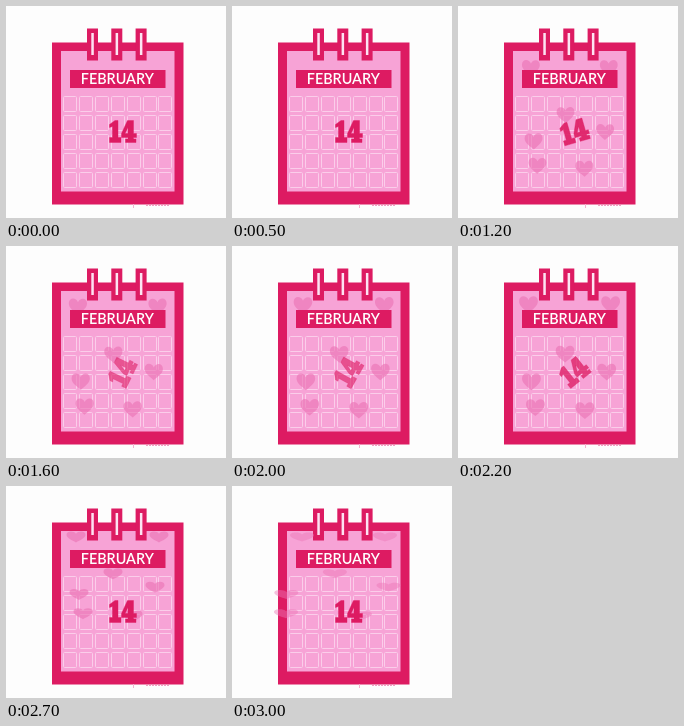
An HTML page with a canvas that plays this animation: 220 by 212 pixels, repeating every 3200 ms.

```html
<!DOCTYPE html>
<html lang="en">
<head>
<meta charset="utf-8">
<title>Calendar</title>
<style>
html, body { margin: 0; width: 100%; height: 100%; overflow: hidden; background: #fdfdfd; }
canvas { display: block; }
</style>
</head>
<body>
<canvas id="stage" width="220" height="212"></canvas>
<script>
const ctx = document.getElementById('stage').getContext('2d');
const RED = '#dd1b62', PINK = '#f7a3d6', LINE = '#fbcdea', HEART = '#eb75b5';
const CX = 117, CY = 126, TOP = 31;

// Where the hearts come to rest after bursting out of the date
const RESTS = [[107, 108], [149, 126], [73, 136], [77, 162], [127, 165], [70, 58], [153, 58]];

const heart = new Path2D('M0 .5C-.2 .3-.5 .1-.5-.2C-.5-.58-.1-.58 0-.28C.1-.58 .5-.58 .5-.2C.5 .1 .2 .3 0 .5Z');
const digits = new Path2D(
  'M-13.5-7L-8-11H-5V6H-2V11H-13.5V6H-10.5V-5L-13.5-4Z' +
  'M4.5-11H10.5V2H13.5V6H10.5V7.5H13V11H2.5V7.5H5V6H-1.5V2Z' +
  'M5-4L2 2H5Z');

// Progress from 0 to 1 between two times
const part = (t, from, to) => Math.min(1, Math.max(0, (t - from) / (to - from)));

function rect(color, x, y, w, h) {
  ctx.fillStyle = color;
  ctx.fillRect(x, y, w, h);
}

function place(x, y, degrees, alpha, draw) {
  ctx.save();
  ctx.translate(x, y);
  ctx.rotate(degrees * Math.PI / 180);
  ctx.globalAlpha = alpha;
  draw();
  ctx.restore();
}

function drawCalendar() {
  rect('#fdfdfd', 0, 0, 220, 212);
  rect(RED, 46, 36.5, 131.5, 162);
  rect(PINK, 55, 45, 113.5, 140.5);
  for (let i = 0; i < 3; i++) {
    const x = 81 + i * 24.3;
    rect(RED, x, 22.5, 11, 32);
    rect('#fde3f3', x + 4.3, 27, 2.5, 22);
  }
  ctx.strokeStyle = LINE;
  ctx.lineWidth = 1;
  for (let row = 0; row < 5; row++)
    for (let col = 0; col < 7; col++) {
      ctx.beginPath();
      ctx.roundRect(57.5 + Math.round(col * 15.9), 90.5 + Math.round(row * 19.1), 13, 15, 1);
      ctx.stroke();
    }
  // Faint fine print under the frame
  rect('#f3b3cf', 127, 198, 1, 4);
  for (let x = 140; x < 163; x += 3) rect('#f0a0c2', x, 199, 2, 1);
}

function drawHearts(t) {
  const burst = part(t, 500, 1000);
  const grow = burst * (0.93 + 0.07 * part(t, 1000, 2400));
  const squash = part(t, 2400, 2700), flare = part(t, 2700, 3000);
  ctx.fillStyle = HEART;
  RESTS.forEach(([restX, restY], i) => {
    const x = CX + (restX - CX) * grow;
    const y = CY + (restY - CY) * grow;
    const risen = y - (y - TOP) * 0.262 * squash;
    // The lower a heart sits, the further it is thrown sideways
    const throwX = (x - 125) * 0.5 * (risen - 51) / 80 * flare;
    const tilt = (i % 2 ? 22 : -22) * (1 - grow);
    place(x + throwX, risen, tilt, 0.65 - 0.2 * flare, () => {
      ctx.scale(19 * grow + 5 * flare, 17 * grow - 6 * squash - 2 * flare);
      ctx.fill(heart);
    });
  });
}

function drawDate(t) {
  const swing = Math.sin(Math.PI * part(t, 1100, 2450));
  ctx.fillStyle = ctx.strokeStyle = RED;
  ctx.lineWidth = 0.4;
  place(CX - swing, CY - 0.5, -70 * swing, 1 - 0.45 * swing, () => {
    ctx.fill(digits, 'evenodd');
    ctx.stroke(digits);
  });
}

function draw(t) {
  drawCalendar();
  if (t >= 500) drawHearts(t);
  rect(RED, 64, 64, 95.5, 18);
  ctx.fillStyle = '#fff';
  ctx.font = '600 14.4px Lato, sans-serif';
  ctx.textAlign = 'center';
  ctx.fillText('FEBRUARY', 111.3, 78);
  drawDate(t);
}

function tick() {
  // The picture moves in steps of 100 ms and rests at the end of the loop
  draw(Math.min(3000, Math.floor(performance.now() % 3200 / 100) * 100));
  requestAnimationFrame(tick);
}
tick();
</script>
</body>
</html>
```
